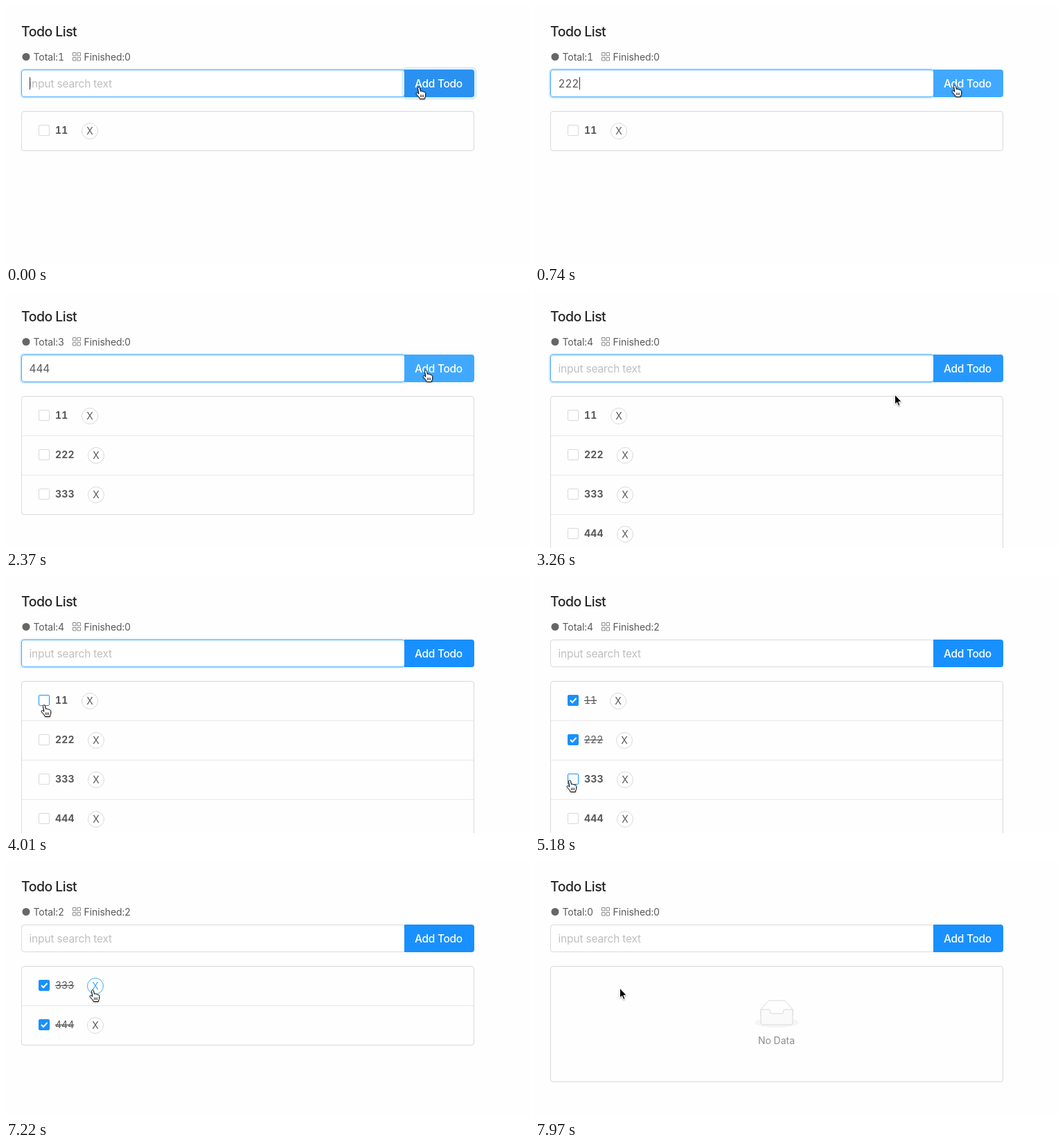
An HTML page that plays this animation: 755x372 px, repeating every 8 s.

```html
<!DOCTYPE html>
<html lang="en">
<head>
<meta charset="utf-8">
<title>Todo List</title>
<style>
html, body { margin: 0; width: 100%; height: 100%; overflow: hidden; background: #fefefe; }
svg { display: block; }
text { font: 14px Inter, "Open Sans", sans-serif; font-variant-numeric: tabular-nums; fill: #595959; white-space: pre; }
.title { font-size: 19.5px; font-weight: 500; letter-spacing: -.55px; fill: #262626; }
.field { font-size: 15.5px; letter-spacing: -.15px; }
.label { font-size: 15.5px; font-weight: 500; letter-spacing: -.32px; fill: #fff; }
.stat { letter-spacing: -.1px; }
.todo { font-weight: 700; letter-spacing: .2px; }
.done .todo { font-weight: 400; letter-spacing: 0; text-decoration: line-through; }
.box { fill: #fff; stroke: #d9d9d9; }
.hover .box { stroke: #1890ff; }
.done .box { fill: #1890ff; stroke: #1890ff; }
.tick { fill: none; stroke: #fff; stroke-width: 2; visibility: hidden; }
.done .tick { visibility: inherit; }
#cursor { filter: drop-shadow(0 1px 1px rgba(0, 0, 0, .3)); }
</style>
</head>
<body>
<svg id="stage" width="755" height="372" viewBox="0 0 755 372">
  <text class="title" x="22" y="44">Todo List</text>
  <circle cx="29" cy="73.5" r="5.5" fill="#666"/>
  <text class="stat" id="total" x="39.5" y="79"></text>
  <path d="M96.5 67.5h4.500v4.500h-4.500zM103 67.500h4.500v4.500h-4.500zM96.500 74.500h4.500v4.500h-4.500zM103 74.500h4.500v4.500h-4.500z" fill="none" stroke="#8c8c8c"/>
  <text class="stat" id="finished" x="112.500" y="79"></text>

  <rect id="ring" x="21" y="91" width="556" height="42" rx="5" fill="none" stroke="#1890ff" stroke-width="2"/>
  <rect id="input" x="22.5" y="92.5" width="553" height="39" rx="3.5" fill="#fff"/>
  <g id="waves"></g>
  <path id="button" d="M575 92h97a4 4 0 0 1 4 4v32a4 4 0 0 1-4 4h-97z"/>
  <text class="label" x="590" y="118">Add Todo</text>
  <text class="field" id="value" x="33.5" y="118"></text>
  <rect id="caret" y="103" width="1" height="18" fill="#333"/>

  <rect id="list" x="22.5" y="152.5" width="653" rx="3.5" fill="none" stroke="#d9d9d9"/>
  <g id="rows"></g>
  <g id="empty">
    <g transform="translate(317 202)" stroke="#d9d9d9">
      <ellipse cx="32" cy="32" rx="32" ry="7" fill="#f5f5f5" stroke="none"/>
      <path d="M55 12.800L44.900 1.300Q44 0 42.900 0H21.100Q20 0 19.100 1.300L9 12.800V22h46z" fill="#fefefe"/>
      <path d="M41.600 16Q41.600 13 43.800 13H55V31Q55 35 52 35H12Q9 35 9 31V13H20.200Q22.400 13 22.400 16T24.600 18.900H39.400Q41.600 18.900 41.600 16z" fill="#fafafa"/>
    </g>
    <text x="348.5" y="265" text-anchor="middle" style="fill:#8c8c8c">No Data</text>
  </g>

  <g id="cursor">
    <g id="hand" transform="translate(-2 2)" stroke="#000" stroke-linejoin="round">
      <path d="M3.600 2.400C3.300.300 6 .100 6.500 2L7.400 6.600C8 5.700 9.500 5.900 9.900 7 10.600 6.300 12 6.700 12.300 7.800 13.400 7.300 14.700 8 14.700 9.600V12C14.700 14 13.500 15 13.400 17.500H6.400C6.200 15.500 3.700 13.500 1.400 10.600.500 9.200 2 8 3.300 9L4.900 10.300z" fill="#fff"/>
      <path d="M7.500 11.500v3.500M9.500 11.500v3.500M11.500 11.500v3.500" stroke-width=".8"/>
    </g>
    <path id="arrow" d="M.5 0V14L3.600 11.200 5.800 16.400 8 15.400 5.900 10.400H10.200z" stroke="#fff" stroke-width="1"/>
  </g>
</svg>
<script>
const LOOP = 8000, ROW = 57;
const $ = id => document.getElementById(id);

const todos = [
  { text: '11', add: -1, check: 4160, remove: 6720 },
  { text: '222', add: 960, check: 4720, remove: 7150 },
  { text: '333', add: 1860, check: 5400, remove: 7520 },
  { text: '444', add: 2520, check: 5950, remove: 7960 }
];
const typing = [
  [0, ''], [300, '2'], [450, '22'], [600, '222'], [960, ''],
  [1340, '3'], [1450, '33'], [1640, '333'], [1860, ''],
  [2080, '4'], [2220, '44'], [2340, '444'], [2520, '']
];
const path = [
  [150, 593, 115], [300, 603, 112], [3000, 603, 112], [3260, 520, 150],
  [3560, 260, 195], [3800, 66, 212], [3980, 52, 184], [4250, 52, 184],
  [4550, 50, 240], [4800, 50, 240], [5100, 47, 293], [5480, 47, 293],
  [5750, 49, 352], [6030, 49, 352], [6330, 118, 200], [6470, 122, 184]
];
const clicks = [-60, 960, 1860, 2520];
const press = [[0, .4], [220, 0], [860, 0], [960, .9], [1200, 0], [1760, 0], [1860, .9], [2100, 0], [2420, 0], [2520, .9], [2760, 0]];
const hover = [[3060, 1], [3360, 0]];
const focus = [[0, .6], [250, 1], [860, 1], [960, .6], [1200, 1], [1760, 1], [1860, .6], [2100, 1], [2420, 1], [2520, .6], [2760, 1], [3920, 1], [4220, 0]];
const caretOff = [[2300, 2520], [3110, 3600], [3920, LOOP]];

// Linear interpolation through [time, value] steps
function track(t, keys, col = 1) {
  const i = keys.findIndex(k => k[0] > t);
  if (i === 0) return keys[0][col];
  if (i < 0) return keys[keys.length - 1][col];
  const a = keys[i - 1], b = keys[i];
  return a[col] + (b[col] - a[col]) * (t - a[0]) / (b[0] - a[0]);
}
const clamp = v => Math.max(0, Math.min(1, v));
const mix = (a, b, k) => a.map((v, i) => v + (b[i] - v) * k);
const rgb = c => `rgb(${c.map(Math.round)})`;
const BLUE = [24, 144, 255], LIGHT = [64, 169, 255], DARK = [9, 109, 217];
const GREY = [217, 217, 217], INK = [89, 89, 89];

function make(tag, parent, attrs, text) {
  const el = document.createElementNS('http://www.w3.org/2000/svg', tag);
  set(el, attrs);
  if (text) el.textContent = text;
  return parent.appendChild(el);
}
function set(el, attrs) {
  for (const k in attrs) el.setAttribute(k, attrs[k]);
}
const show = (el, on) => el.setAttribute('visibility', on ? 'inherit' : 'hidden');

for (const todo of todos) {
  const g = todo.el = make('g', $('rows'), {});
  todo.line = make('path', g, { d: 'M23 152.5H675', stroke: '#e8e8e8' });
  make('rect', g, { class: 'box', x: 47.5, y: 172.5, width: 15, height: 15, rx: 1.5 });
  make('path', g, { class: 'tick', d: 'M51 180l3 3 5.500-6' });
  make('text', g, { class: 'todo', x: 71, y: 185 }, todo.text);
  todo.close = make('g', g, {});
  todo.circle = make('circle', todo.close, { cy: 181, r: 11.5, fill: '#fff' });
  todo.cross = make('text', todo.close, { y: 185.5, 'text-anchor': 'middle' }, 'X');
}
const waves = clicks.map(() => make('rect', $('waves'), { fill: '#1890ff' }));

function drawField(t) {
  const value = typing.filter(s => s[0] <= t).pop()[1];
  const f = track(t, focus);
  $('value').textContent = value || 'input search text';
  $('value').style.fill = value ? '#595959' : '#bfbfbf';
  set($('ring'), { opacity: .2 * f });
  set($('input'), { stroke: rgb(mix(GREY, LIGHT, clamp(f * 2))) });
  set($('caret'), { x: 34 + (value ? Math.round($('value').getComputedTextLength()) : 0) });
  show($('caret'), !caretOff.some(([a, b]) => t >= a && t < b));
  set($('button'), { fill: rgb(mix(mix(BLUE, LIGHT, track(t, hover)), DARK, track(t, press))) });

  waves.forEach((el, i) => {
    const age = t - clicks[i];
    const out = ms => 1 - (1 - clamp(age / ms)) ** 6;
    const s = 6 * out(400);
    set(el, { x: 575 - s, y: 92 - s, width: 101 + 2 * s, height: 40 + 2 * s, rx: 4 + s, opacity: age < 0 ? 0 : .2 * (1 - out(1200)) });
  });
}

function drawList(t, x, y) {
  const live = todos.filter(d => t >= d.add && t < d.remove);
  let overItem = false;
  for (const d of todos) {
    const row = live.indexOf(d);
    show(d.el, row >= 0);
    if (row < 0) continue;
    const done = t >= d.check, cx = (done ? 102 : 103) + 9 * d.text.length;
    const mid = 180.5 + ROW * row;
    const onBox = x >= 46 && x <= 64 && Math.abs(y - mid) < 9;
    const onClose = Math.hypot(x - cx, y - mid) < 12;
    overItem = overItem || onBox || onClose;
    set(d.el, { transform: `translate(0 ${ROW * row})`, class: (done ? 'done ' : '') + (onBox ? 'hover' : '') });
    show(d.line, row > 0);
    const k = onClose ? clamp((t - 6490) / 300) : 0;
    set(d.circle, { cx, stroke: rgb(mix(GREY, LIGHT, k)) });
    set(d.cross, { x: cx });
    d.cross.style.fill = rgb(mix(INK, LIGHT, k));
  }
  $('total').textContent = 'Total:' + live.length;
  $('finished').textContent = 'Finished:' + live.filter(d => t >= d.check).length;
  set($('list'), { height: live.length ? ROW * live.length : 167 });
  show($('empty'), !live.length);
  return overItem;
}

function draw(t) {
  const x = track(t, path, 1), y = track(t, path, 2);
  drawField(t);
  const overItem = drawList(t, x, y);
  const hand = overItem || (x >= 575 && x < 676 && y >= 92 && y < 132);
  set($('cursor'), { transform: `translate(${Math.round(x)} ${Math.round(y)})` });
  show($('hand'), hand);
  show($('arrow'), !hand);
}

const start = performance.now();
function tick() {
  draw((performance.now() - start) % LOOP);
  requestAnimationFrame(tick);
}
tick();
</script>
</body>
</html>
```
